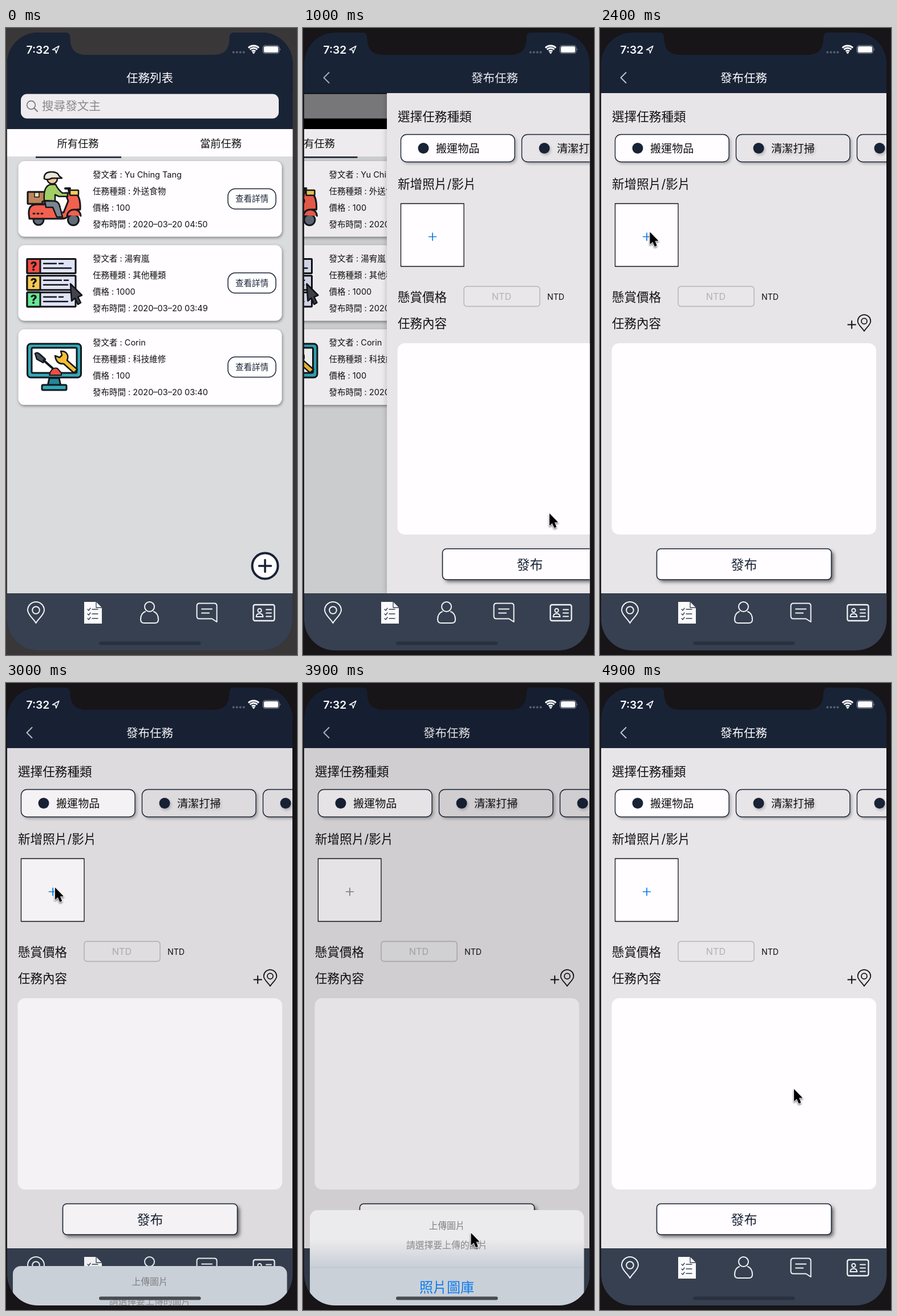
An HTML page with a canvas for the animation above (5000 ms loop, 510 by 1098 pixels).

```html
<!DOCTYPE html>
<html lang="zh-Hant">
<head>
<meta charset="utf-8">
<title>任務列表</title>
<style>
html, body { margin: 0; width: 100%; height: 100%; overflow: hidden; background: #171518; }
canvas { display: block; width: 510px; height: 1098px; }
</style>
</head>
<body>
<canvas id="stage" width="510" height="1098"></canvas>
<script>
const ctx = document.getElementById('stage').getContext('2d');
const FONT = 'Inter, "Noto Sans CJK TC", "Noto Sans CJK JP", "Noto Sans CJK", sans-serif';
const NAVY = '#192336', BAR = '#364050', PAGE = '#e7e5e8', BLUE = '#0a7bee', INK = '#111';
const LOOP = 5000, STEP = 100;

// Keyframes: [time, value...]
const PUSH = [[700, 500], [800, 431], [900, 275], [1000, 145], [1100, 65], [1200, 24], [1300, 6], [1400, 0]];
const SHEET = [[2900, 365], [3000, 288], [3100, 118], [3200, 32], [3300, 0], [3700, 0],
  [3800, 62], [3900, 190], [4000, 288], [4100, 336], [4200, 365]];
const DIM = [[2900, 0], [3000, .045], [3100, .13], [3200, .19], [3300, .22], [3700, .22],
  [3800, .18], [3900, .1], [4000, .045], [4100, .015], [4200, 0]];
const POINTER = [[200, 522, 905], [300, 488, 930], [400, 456, 938], [700, 458, 940], [800, 470, 942],
  [1000, 432, 850], [1200, 330, 600], [1400, 225, 380], [1600, 181, 288], [1900, 130, 325],
  [2200, 88, 357], [3000, 86, 358], [3100, 98, 368], [3300, 148, 409], [3500, 205, 730],
  [3700, 256, 1004], [3800, 259, 1006], [4000, 330, 920], [4100, 362, 862], [4400, 350, 770], [4700, 340, 711]];

const clamp = v => Math.max(0, Math.min(1, v));

function at(keys, t) {
  let i = 0;
  while (i < keys.length - 1 && keys[i + 1][0] <= t) i++;
  const a = keys[i], b = keys[i + 1] || a;
  const k = b === a ? 0 : clamp((t - a[0]) / (b[0] - a[0]));
  return a.slice(1).map((v, j) => v + (b[j + 1] - v) * k);
}

function group(x, y, alpha, draw) {
  ctx.save();
  ctx.translate(x, y);
  ctx.globalAlpha *= alpha;
  draw();
  ctx.restore();
}

function shape(path, fill, stroke, width = 2.5) {
  const p = typeof path === 'string' ? new Path2D(path) : path;
  if (fill) { ctx.fillStyle = fill; ctx.fill(p); }
  if (stroke) {
    ctx.strokeStyle = stroke;
    ctx.lineWidth = width;
    ctx.lineJoin = ctx.lineCap = 'round';
    ctx.stroke(p);
  }
}

function box(x, y, w, h, r, fill, stroke, width) {
  const p = new Path2D();
  p.roundRect(x, y, w, h, r);
  shape(p, fill, stroke, width);
}

function dot(x, y, r, fill, stroke, width) {
  const p = new Path2D();
  p.arc(x, y, r, 0, 7);
  shape(p, fill, stroke, width);
}

function raised(dx, dy, blur, color, draw) {
  ctx.save();
  ctx.shadowOffsetX = dx;
  ctx.shadowOffsetY = dy;
  ctx.shadowBlur = blur;
  ctx.shadowColor = color;
  draw();
  ctx.restore();
}

function text(s, x, y, size, color = INK, align = 'left', weight = 400) {
  ctx.font = `${weight} ${size}px ${FONT}`;
  ctx.textAlign = align;
  ctx.textBaseline = 'alphabetic';
  ctx.fillStyle = color;
  ctx.fillText(s, x, y + size * .37);
}

function scooter() {
  const k = '#15171b';
  dot(57, 336, 9, '#626b78', k, 3);
  dot(118, 336, 9.5, '#626b78', k, 3);
  shape('M110 284L124 322', null, k, 4);
  shape('M40 326Q39 310 52 309H80L87 323H101L109 303L104 289H122Q131 296 130 318Q116 316 109 328Q106 334 98 334H41Z', '#f4604f', k, 3);
  shape('M107 328Q110 317 121 318Q130 319 131 329', '#f4604f', k, 3);
  box(38, 287, 31, 21, 1, '#bd855c', k, 3);
  box(50, 288, 8, 8, 0, '#efd9b4', k, 1.5);
  box(63, 303, 24, 6, 3, '#3c4049', k, 2);
  shape('M68 303H84Q93 303 95 315L99 331H89L82 314H70Z', '#7b8492', k, 2.5);
  shape('M67 302Q65 277 78 274H87Q91 283 99 289H108V295H93L86 292V303Z', '#a2cf65', k, 2.5);
  dot(81, 264, 9, '#f2c6a3', k, 2.5);
  shape('M67 264Q66 252 80 252Q91 252 93 259L98 263H81Q72 267 67 264Z', '#e9e6d5', k, 2.5);
  box(112, 284, 15, 9, 1, '#f8cd55', k, 2.5);
  shape('M104 281H112', null, k, 4);
  [48, 55, 62].forEach(x => shape(`M${x} 325h2`, null, k, 3));
}

function quiz() {
  const k = '#111217';
  ['#f04d45', '#f7c952', '#66e895'].forEach((c, i) => {
    const y = 404.5 + i * 29.3;
    box(37, y, 85, 25, 1, '#dfe3f5', k, 3);
    box(37, y, 23, 25, 1, c, k, 3);
    text('?', 48.5, y + 12.5, 21, k, 'center', 800);
    shape(`M66 ${y + 8}h${i === 1 ? 31 : 22}M${i === 1 ? 102 : 93} ${y + 8}h7M66 ${y + 16}h${i ? 42 : 48}`, null, k, 2.5);
  });
  shape('M113 448L115 478L121 473L126 484L131 481L126 471L133 468Z', '#42444d', k, 2.5);
}

function monitor() {
  const k = '#11181d';
  shape('M76 613H93L96 627H73Z', '#258799', k, 3);
  box(63, 625, 43, 9, 2, '#35a8b9', k, 3);
  box(37.5, 553, 94, 59, 6, '#35a8b9', k, 3);
  box(45, 560, 79, 44, 2, '#fff', k, 3);
  shape('M51 570Q55 567 59 571L69 580L65 586L54 580Z', '#4b515b', k, 2.5);
  shape('M66 582L83 597', null, k, 4);
  shape('M78 602Q82 594 90 596L97 604V608H76Z', '#ef4c43', k, 2);
  shape('M86 574L94 577L98 573L96 566Q105 565 108 573Q109 578 107 582L125 598L119 604L101 588Q88 589 86 574Z', '#fabd32', k, 2.5);
}

const CARDS = [
  ['Yu Ching Tang', '外送食物', '100', '04:50', scooter],
  ['湯宥嵐', '其他種類', '1000', '03:49', quiz],
  ['Corin', '科技維修', '100', '03:40', monitor]
];

function card([name, kind, price, time, icon], i) {
  const y = 233 + i * 147.3;
  raised(1, 2, 5, 'rgba(0,0,0,.42)', () => box(21.5, y, 462, 132.5, 11, '#fffdff'));
  icon();
  [`發文者 : ${name}`, `任務種類 : ${kind}`, `價格 : ${price}`, `發布時間 : 2020–03–20 ${time}`]
    .forEach((s, n) => text(s, 152, y + 23.5 + n * 29, 14.5));
  box(389, y + 48.5, 84, 35.5, 13, '#fff', NAVY, 1.5);
  text('查看詳情', 431, y + 66, 14.5, NAVY, 'center');
}

function searchBar() {
  box(26, 115.5, 452, 43, 11, '#eeecef');
  dot(44, 135, 7.3, null, '#77777b', 1.7);
  shape('M49.5 140.5L55 146', null, '#77777b', 2);
  text('搜尋發文主', 63, 136, 20.6, '#89898c');
}

function listPage() {
  ctx.fillStyle = '#dadbdd';
  ctx.fillRect(0, 225, 520, 765);
  ctx.fillStyle = '#fffdff';
  ctx.fillRect(0, 177, 720, 48);
  text('所有任務', 126, 202, 18.3, INK, 'center');
  text('當前任務', 376.5, 202, 18.3, INK, 'center');
  ctx.fillStyle = NAVY;
  ctx.fillRect(52, 225, 150, 2.6);
  CARDS.forEach(card);
  dot(454, 942, 22.5, '#fff', NAVY, 4);
  shape('M443.5 942h21M454 931.5v21', null, NAVY, 3.6);
}

function pin(x, y, s, color, width) {
  group(x, y, 1, () => {
    ctx.scale(s, s);
    shape('M0 18.5C-4 11 -14.5 4 -14.5 -4A14.5 14.5 0 0 1 14.5 -4C14.5 4 4 11 0 18.5Z', null, color, width / s);
    dot(0, -4, 6.3, null, color, width / s);
  });
}

function chip(x, label, fill) {
  raised(3, 3, 5, 'rgba(0,0,0,.3)', () => box(x, 186.5, 199.5, 48, 10, fill));
  box(x, 186.5, 199.5, 48, 10, null, NAVY, 1.4);
  raised(2, 3, 4, fill === PAGE ? 'rgba(0,0,0,.2)' : 'transparent', () => {
    dot(x + 39.5, 210.5, 9.5, NAVY);
    text(label, x + 61.5, 211, 19.1);
  });
}

function formPage(tint) {
  ctx.fillStyle = PAGE;
  ctx.fillRect(0, 114, 502, 876);
  text('選擇任務種類', 21, 155.5, 21.6);
  chip(26.5, '搬運物品', '#fffdff');
  chip(238.5, '清潔打掃', PAGE);
  chip(450.5, '外送食物', PAGE);
  text('新增照片/影片', 21, 273, 21.6);
  ctx.fillStyle = '#fffdff';
  ctx.fillRect(26.5, 307.5, 110.5, 110);
  ctx.strokeStyle = '#111';
  ctx.lineWidth = 1.3;
  ctx.strokeRect(26.5, 307.5, 110.5, 110);
  shape('M75.5 365.5h13M82 359v13', null, tint, 1.7);
  text('懸賞價格', 21, 471, 21.5);
  box(137, 452.5, 133, 35, 5, '#e9e7ea', '#b3b2b5', 1.4);
  text('NTD', 203, 470, 16.2, '#b2b1b5', 'center');
  text('NTD', 283, 470.5, 14.2);
  text('任務內容', 21, 517.5, 21.5);
  shape('M434.5 519.5h13.5M441.2 513v13', null, INK, 2);
  pin(463, 516.5, .78, INK, 1.7);
  box(20.5, 552, 463.5, 335, 13, '#fffdff');
  raised(4, 4, 6, 'rgba(0,0,0,.55)', () => box(99.5, 912, 306, 54, 7, '#fffdff'));
  box(99.5, 912, 306, 54, 7, null, NAVY, 1.6);
  text('發布', 252.5, 939, 23, NAVY, 'center');
}

function tabBar() {
  const w = '#f1f3f6';
  ctx.fillStyle = BAR;
  ctx.fillRect(0, 990, 510, 108);
  ctx.fillStyle = '#2d3643';
  ctx.fillRect(0, 990, 510, 1);
  pin(52.5, 1023.5, 1, w, 2);
  shape('M137 1005H158L168 1015V1043H137Z', '#fbfbfd');
  shape('M158 1005V1015H168', null, BAR, 1.3);
  [1018, 1026, 1034].forEach(y =>
    shape(`M143 ${y}l2 2l3 -4M151 ${y}h10`, null, BAR, 1.4));
  dot(251.5, 1013.5, 8.5, null, w, 2);
  shape('M244 1022Q236 1025 236 1036Q236 1042 242 1042H261Q267 1042 267 1036Q267 1025 259 1022', null, w, 2);
  shape('M339 1007.5H365Q369.5 1007.5 369.5 1012V1040L361 1034.5H339Q334.5 1034.5 334.5 1030V1012Q334.5 1007.5 339 1007.5Z', null, w, 2);
  shape('M343 1017.5h18M343 1024.5h13', null, w, 2);
  box(433.5, 1010, 37, 28, 3, null, w, 2.3);
  dot(444.5, 1020, 3.2, null, w, 2);
  shape('M438.5 1031Q439 1025.5 444.5 1025.5T450.5 1031Z', null, w, 2);
  shape('M456 1018.5h9M456 1024.5h9M456 1030.5h9', null, w, 2);
}

function header(p) {
  ctx.fillStyle = NAVY;
  ctx.fillRect(0, 0, 510, 114);
  if (p < 1) {
    const q = clamp((p - .14) / .5);
    group(-90 * q, 0, 1 - q, () => text('任務列表', 252, 87.5, 20.5, '#fff', 'center', 500));
  }
  if (p > 0) {
    group(290 * (1 - p), 0, clamp(p * 1.3), () => text('發布任務', 252, 87.5, 20.5, '#fff', 'center', 500));
    group(0, 0, clamp(p * 1.2), () => shape('M45.5 78L36.5 87L45.5 96', null, '#c3c8cf', 1.9));
  }
}

function statusBar() {
  text('7:32', 35.5, 38, 19.3, '#fff', 'left', 600);
  shape('M81.5 38L93 31.5L87.8 44L86.8 38.6Z', null, '#fff', 1.5);
  for (let i = 0; i < 4; i++) dot(398.7 + i * 6, 42.5, 2, '#566070');
  for (const r of [4.5, 9, 13]) {
    ctx.beginPath();
    ctx.arc(434, 44, r, -Math.PI * .75, -Math.PI * .25);
    ctx.lineWidth = 2.8;
    ctx.lineCap = 'butt';
    ctx.strokeStyle = '#fff';
    ctx.stroke();
  }
  shape('M434 45.5L431.3 42.5Q434 40.8 436.7 42.5Z', '#fff');
  box(450.5, 30.5, 28, 14, 4, null, 'rgba(255,255,255,.5)', 1.2);
  box(452, 32, 25, 11, 2.8, '#fff');
  shape('M480 35.5Q482 37.5 480 39.5Z', '#9aa1ac');
}

function sheet(offset) {
  const glass = ctx.createLinearGradient(0, 975, 0, 1020);
  glass.addColorStop(0, '#ebeaec');
  glass.addColorStop(1, '#cad0d8');
  box(12, 733 + offset, 480.5, 239, 14, glass);
  group(0, offset, 1, () => {
    text('上傳圖片', 252, 760, 15.8, '#7e7e82', 'center', 500);
    text('請選擇要上傳的圖片', 252, 794, 15.8, '#89898c', 'center');
    ctx.fillStyle = '#c2c1c4';
    ctx.fillRect(12, 833, 480.5, 1);
    ctx.fillRect(12, 902.5, 480.5, 1);
    text('照片圖庫', 252, 868.5, 24, BLUE, 'center');
    text('相機', 252, 938, 24, BLUE, 'center');
    box(12, 982, 480.5, 68.5, 14, '#fff');
    text('取消', 252, 1016.5, 24, BLUE, 'center', 500);
  });
}

function pointer(x, y) {
  group(x, y, 1, () => raised(0, 2, 3, 'rgba(0,0,0,.35)', () => {
    const p = 'M0 0V21.5L4.8 17L8.4 25.3L12.2 23.7L8.7 15.5H15Z';
    shape(p, null, '#fff', 2.6);
    shape(p, '#000');
  }));
}

function screen(t) {
  const [x] = at(PUSH, t), p = 1 - x / 500;
  const [offset] = at(SHEET, t), [dim] = at(DIM, t);
  ctx.fillStyle = p > 0 ? '#000' : NAVY;
  ctx.fillRect(0, 0, 510, 1098);
  if (p < 1) {
    group(-350 * p, 0, clamp(1 - p * .7), searchBar);
    group(-150 * p, 0, 1, listPage);
    if (p > 0) {
      ctx.fillStyle = `rgba(0,0,0,${.1 * p})`;
      ctx.fillRect(0, 177, 510, 813);
    }
  }
  if (p > 0) {
    group(x, 0, 1, () => {
      if (x > 0) raised(-2, 0, 8, 'rgba(0,0,0,.16)', () => box(2, 114, 500, 876, 0, PAGE));
      ctx.beginPath();
      ctx.rect(2, 114, 500, 876);
      ctx.clip();
      formPage(t >= 3100 && t < 4000 ? '#88888b' : BLUE);
    });
  }
  header(p);
  tabBar();
  if (dim > 0) {
    ctx.fillStyle = `rgba(0,0,0,${dim})`;
    ctx.fillRect(0, 0, 510, 1098);
  }
  const up = offset < 365;
  if (up) sheet(offset);
  statusBar();
  const moving = up && offset > 40;
  box(163, 1074.5, 178.5, 6, 3, moving ? '#484c52' : up ? '#202732' : '#29313e');
}

function draw(t) {
  const bezel = t < 300 ? '#3a3738' : '#171518';
  ctx.fillStyle = bezel;
  ctx.fillRect(0, 0, 510, 1098);
  ctx.save();
  ctx.beginPath();
  ctx.roundRect(2, 8, 500.5, 1082, 54);
  ctx.clip();
  screen(t);
  ctx.restore();
  shape('M104 7Q112 8 112.5 17V21Q114 47 140 47H364Q390 47 391.5 21V17Q392 8 400 7Z', bezel);
  if (t >= 200) pointer(...at(POINTER, t));
}

function tick() {
  const t = performance.now() % LOOP;
  draw(Math.floor(t / STEP) * STEP);
  requestAnimationFrame(tick);
}
tick();
</script>
</body>
</html>
```
